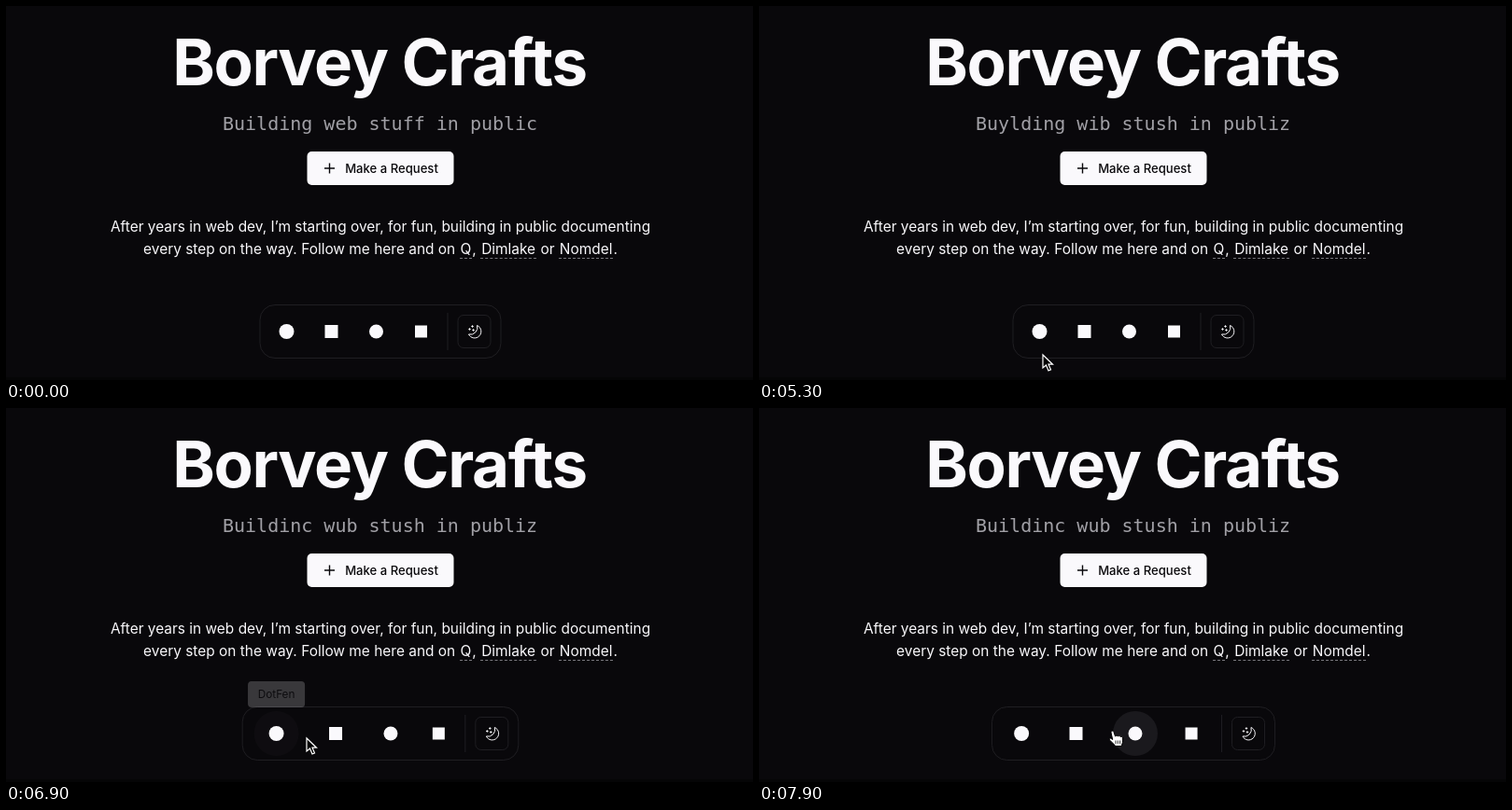
An HTML page for the animation above (8000 ms loop, 800 by 401 pixels).

```html
<!DOCTYPE html>
<html lang="en">
<head>
<meta charset="utf-8">
<title>Borvey Crafts</title>
<style>
  html, body { margin: 0; width: 100%; height: 100%; overflow: hidden; background: #09080b; }
  body { position: relative; color: #faf9fc; font-family: Inter, sans-serif; }
  svg { position: absolute; left: 0; top: 0; }
  text { text-anchor: middle; }
  p { position: absolute; margin: 0; left: 1px; top: 225px; width: 800px; text-align: center; white-space: nowrap; font-size: 15.45px; line-height: 24px; }
  p span { padding: 0 1px; border-bottom: 1px dashed #77767c; }
  .title { font-size: 69px; font-weight: 700; letter-spacing: -.02em; }
  .mono { font: 20px "DejaVu Sans Mono", monospace; fill: #a1a0a6; text-anchor: start; white-space: pre; }
  .outline { fill: none; stroke: #1f1e22; }
  .halo { fill: #232226; }
  .tip text { font-size: 11.8px; fill: #18171b; }
</style>
</head>
<body>
<p>After years in web dev, I’m starting over, for fun, building in public documenting<br>every step on the way. Follow me here and on <span>Q</span>, <span>Dimlake</span> or <span>Nomdel</span>.</p>
<svg width="800" height="401" viewBox="0 0 800 401" fill="#faf9fc">
  <rect y="398" width="800" height="3" fill="#050506"/>
  <text class="title" x="400" y="85">Borvey Crafts</text>
  <text class="mono" id="tagline" x="232" y="133"></text>

  <rect x="322.5" y="156" width="157" height="36" rx="5"/>
  <path d="M341 174h11M346.5 168.5v11" stroke="#09080b" stroke-width="1.4"/>
  <text x="413" y="178.5" font-size="13.1" font-weight="500" fill="#09080b">Make a Request</text>

  <rect class="outline" id="dock" y="320.5" height="57" rx="16"/>
  <g id="icons">
    <g><circle class="halo" r="24"/><circle r="8"/></g>
    <g><circle class="halo" r="24"/><rect x="-7" y="-7" width="14" height="14"/></g>
    <g><circle class="halo" r="24"/><circle r="7.5"/></g>
    <g><rect x="-6.5" y="-6.5" width="13" height="13"/></g>
  </g>
  <g id="theme">
    <path class="outline" d="M-28.5-20v40"/>
    <rect class="outline" x="-17.5" y="-17.5" width="35" height="35" rx="6"/>
    <g transform="translate(-7.5 -7.5)" fill="none" stroke="#faf9fc">
      <path d="M10.5 1A7 7 0 1 1 1.5 10.5A7.5 7.5 0 0 0 10.5 1Z"/>
      <path d="M1.3 5h2.4M2.5 3.8v2.4M4.3 2h2.4M5.5 .8v2.4M5.3 6h2.4M6.5 4.8v2.4"/>
    </g>
  </g>

  <g class="tip"><rect x="-30.5" width="61" height="28" rx="4"/><text y="18.2">DotFen</text></g>
  <g class="tip"><rect x="-40" width="80" height="28" rx="4"/><text y="18.2">Q / Tilfern</text></g>

  <g id="cursor">
    <path id="arrow" d="M0 0V14L3.5 11L6 17L8.5 16L6 10.2H10.5Z" fill="#000" stroke="#fff" stroke-width="1.2"/>
    <g id="hand">
      <path d="M-2 1C-2-1 .5-1.5 1 .5L2.5 5C3.5 4 5 4 5.5 5C6.5 4.3 8 4.5 8.3 5.6C9.3 5 10.6 5.5 10.6 7V10C10.6 12 9.5 13 9.5 15.5H2.5C2 13.5-1 12-3.5 9C-4.5 7.5-3 6.5-1.8 7.5L-.3 8.5Z" fill="#fff" stroke="#000"/>
      <path d="M3 9.5v3.500M5.300 9.500v3.500M7.600 9.500v3.500" stroke="#000" stroke-width=".8"/>
    </g>
  </g>
</svg>
<script>
const LOOP = 8000, STEP = 100, CENTER = 401, ICON_Y = 349;
const BASE = 40, GROWTH = 20, REACH = 140, GAP = 8, PAD = 8.5;
const DOCK_LAG = 100;

const $ = id => document.getElementById(id);
const all = selector => [...document.querySelectorAll(selector)];
const icons = [...$('icons').children], halos = all('.halo'), tips = all('.tip');

const clamp = v => Math.max(0, Math.min(1, v));
const ramp = (t, start, length) => clamp((t - start) / length);
const place = (el, x, y) => el.setAttribute('transform', `translate(${x} ${y})`);
const show = (el, visible) => el.setAttribute('visibility', visible ? 'visible' : 'hidden');

const taglines = [
  [0, 'Building web stuff in public'],
  [1600, 'Buylding web stuff in public'],
  [3400, 'Buylding web stuff in publiz'],
  [4300, 'Buylding wib stuff in publiz'],
  [4700, 'Buylding wib stush in publiz'],
  [5500, 'Buildinc wib stush in publiz'],
  [6400, 'Buildinc wub stush in publiz']
];

// time, x, y of the pointer's hot spot
const pointerPath = [
  [5200, 304, 392], [5300, 304, 374], [5400, 304, 366], [5500, 304, 361],
  [6700, 304, 361], [6800, 319, 356], [6900, 322, 354], [7200, 337, 352],
  [7400, 337, 352], [7500, 339, 351], [7600, 375, 348], [7900, 379, 347]
];

const hovers = [
  { enter: 5300, leave: 6700, tip: 6050 },
  { enter: 6950, leave: 7650, tip: 7050 },
  { enter: 7800, leave: LOOP }
];

function pointerAt(t) {
  const next = pointerPath.findIndex(p => p[0] > t);
  if (next < 0) return pointerPath.at(-1).slice(1);
  if (next === 0) return pointerPath[0].slice(1);
  const a = pointerPath[next - 1], b = pointerPath[next];
  const k = ramp(t, a[0], b[0] - a[0]);
  return [a[1] + (b[1] - a[1]) * k, a[2] + (b[2] - a[2]) * k];
}

// Cells widen near the pointer, which shifts their centres, so settle by iterating.
function layout(mouseX, amount) {
  let centers = [300.5, 348.5, 396.5, 444.5], left, width;
  for (let pass = 0; pass < 8; pass++) {
    const cells = centers.map(c => BASE + amount * GROWTH * clamp(1 - Math.abs(mouseX - c) / REACH));
    width = 98 + cells.reduce((sum, w) => sum + w, 0);
    left = CENTER - width / 2;
    let x = left + PAD;
    centers = cells.map(w => {
      const center = x + w / 2;
      x += w + GAP;
      return center;
    });
  }
  return { centers, left, width };
}

function draw(t) {
  $('tagline').textContent = taglines.findLast(([start]) => start <= t)[1];

  const [x, y] = pointerAt(t);
  const present = t >= 5200;
  const overIcon = t >= 5400 && t < 6800 || t >= 7000;
  place($('cursor'), x, y);
  show($('arrow'), present && !overIcon);
  show($('hand'), present && overIcon);

  const { centers, left, width } = layout(pointerAt(t - DOCK_LAG)[0], ramp(t, 5300, 300));
  $('dock').setAttribute('x', left);
  $('dock').setAttribute('width', width);
  icons.forEach((icon, i) => place(icon, centers[i], ICON_Y));
  place($('theme'), left + width - 28.5, ICON_Y);

  hovers.forEach(({ enter, leave, tip }, i) => {
    const fade = 1 - ramp(t, leave, 250);
    halos[i].setAttribute('opacity', ramp(t, enter, 150) * fade);
    if (!tip) return;
    const rise = ramp(t, tip, 150);
    place(tips[i], centers[i], 293 + 9 * (1 - rise));
    tips[i].setAttribute('opacity', rise * fade);
  });
}

function frame() {
  const t = performance.now() % LOOP;
  draw(Math.floor(t / STEP) * STEP);
  requestAnimationFrame(frame);
}
frame();
</script>
</body>
</html>
```
